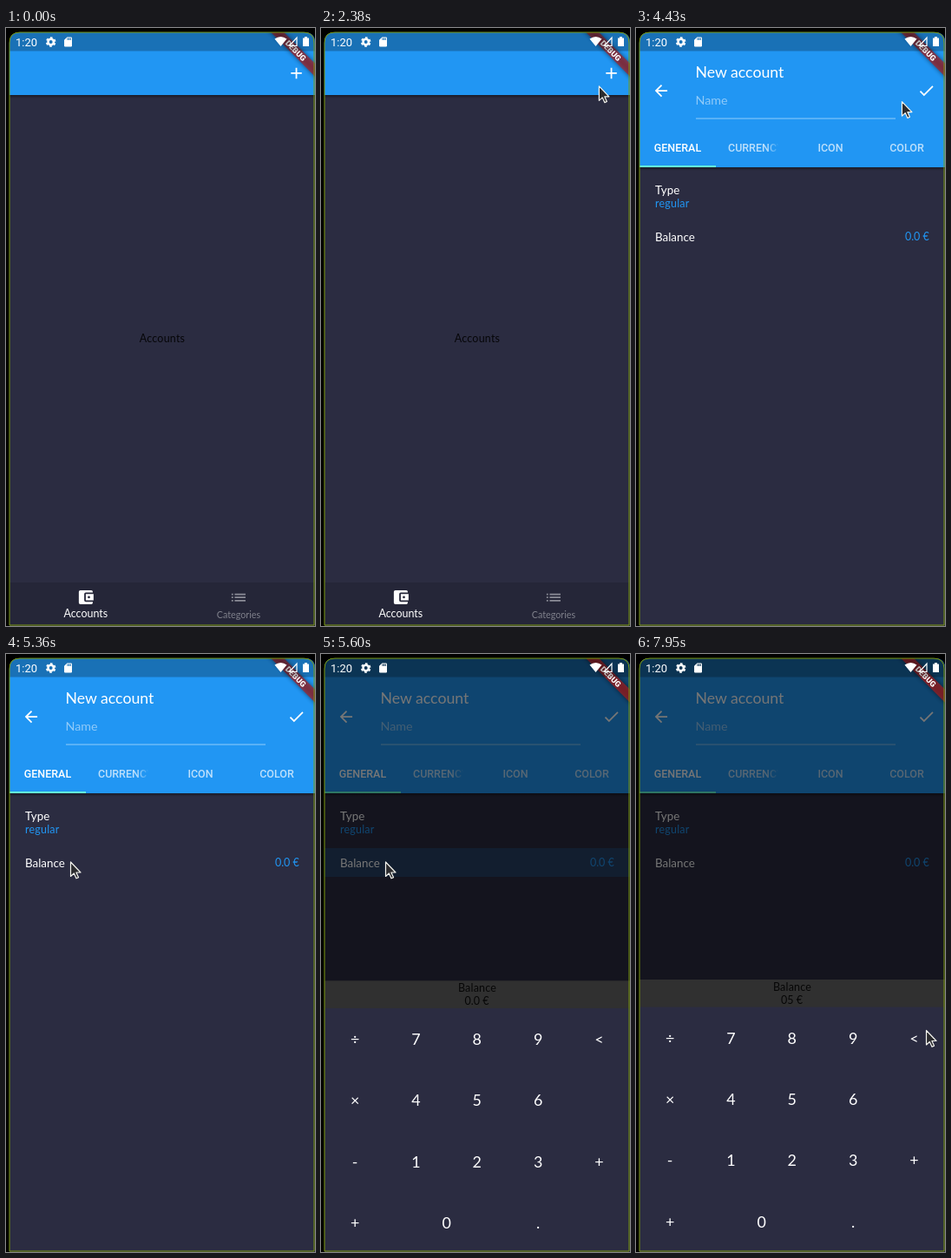
These frames come from a looping animation (356x687 px, 8 s). An HTML page:

```html
<!DOCTYPE html>
<html lang="en">
<head>
<meta charset="utf-8">
<title>New account</title>
<style>
html, body { margin: 0; width: 100%; height: 100%; overflow: hidden; background: #000; }
svg { display: block; width: 356px; height: 687px; }
text { font-family: Lato, "Open Sans", sans-serif; font-size: 12.5px; fill: #fff; white-space: pre; }
.mid { text-anchor: middle; }
.end { text-anchor: end; }
.spaced { letter-spacing: .2px; }
.row { font-size: 13.4px; }
.blue { fill: #2196f3; }
.dark { fill: #000; fill-opacity: .87; }
.tab { font-family: Roboto, sans-serif; font-weight: 500; }
.off { fill-opacity: .7; }
.key { font-size: 17.9px; text-anchor: middle; }
.icon { fill: #fff; }
</style>
</head>
<body>
<svg viewBox="0 0 356 687" width="356" height="687">
  <defs>
    <clipPath id="screen"><path d="M4 687V17Q4 5 16 5H344Q356 5 356 17V687Z"/></clipPath>
    <linearGradient id="shade" x2="0" y2="1">
      <stop stop-color="#000" stop-opacity=".4"/>
      <stop offset="1" stop-color="#000" stop-opacity="0"/>
    </linearGradient>
    <linearGradient id="fade" gradientUnits="userSpaceOnUse" x1="150" x2="165" y1="0" y2="0">
      <stop stop-color="#fff" stop-opacity=".7"/>
      <stop offset="1" stop-color="#fff" stop-opacity="0"/>
    </linearGradient>
    <clipPath id="tabBox"><rect x="106" y="120" width="57.5" height="30"/></clipPath>
    <filter id="blur" x="-20%" y="-100%" width="140%" height="300%"><feGaussianBlur stdDeviation="2.6"/></filter>
  </defs>

  <g clip-path="url(#screen)">
    <rect width="356" height="687" fill="#2b2c41"/>

    <g id="home">
      <rect x="4" y="77" width="352" height="4" fill="url(#shade)"/>
      <rect x="4" y="5" width="352" height="72" fill="#2196f3"/>
      <path class="icon" transform="translate(323.8 41.2) scale(.894)" d="M19 13h-6v6h-2v-6H5v-2h6V5h2v6h6z"/>
      <text class="mid dark spaced" x="180" y="361">Accounts</text>
      <rect x="4" y="637" width="352" height="50" fill="#252638"/>
      <path class="icon" transform="translate(81.2 643.2) scale(.894)" d="M21 18v1q0 2-2 2H5q-2 0-2-2V5q0-2 2-2h14q2 0 2 2v1h-9q-2 0-2 2v8q0 2 2 2zm-9-2h10V8H12zm4-2.500a1.500 1.500 0 1 1 0-3 1.500 1.500 0 0 1 0 3z"/>
      <text class="mid" x="91.8" y="677">Accounts</text>
      <path fill="#8b8c97" transform="translate(257.2 643.5) scale(.894)" d="M3 11h2v2H3zm0 4h2v2H3zm0-8h2v2H3zm4 4h14v2H7zm0 4h14v2H7zm0-8h14v2H7z"/>
      <text class="mid" x="268" y="678" style="font-size:10.75px;fill:#7f808b">Categories</text>
    </g>

    <g id="form">
      <rect x="4" y="5" width="352" height="682" fill="#2b2c41"/>
      <rect x="4" y="160" width="352" height="4" fill="url(#shade)"/>
      <rect x="4" y="5" width="352" height="155" fill="#2196f3"/>
      <path class="icon" transform="translate(18.2 61.3) scale(.894)" d="M20 11H7.8l5.600-5.600L12 4l-8 8 8 8 1.400-1.400L7.800 13H20z"/>
      <path class="icon" transform="translate(323.8 61.3) scale(.894)" d="M9 16.200L4.800 12l-1.400 1.400L9 19 21 7l-1.400-1.400z"/>
      <text x="68.5" y="57" style="font-size:17.7px">New account</text>
      <text x="68.5" y="88" style="font-size:14.3px" fill-opacity=".5">Name</text>
      <rect x="69" y="103.5" width="230" height="1" fill="#fff" opacity=".5"/>
      <text class="tab mid" x="48" y="141.5">GENERAL</text>
      <text class="tab" x="106" y="141.5" clip-path="url(#tabBox)" style="fill:url(#fade)">CURRENCY</text>
      <text class="tab mid off" x="224" y="141.5">ICON</text>
      <text class="tab mid off" x="312" y="141.5">COLOR</text>
      <rect x="4" y="158" width="88" height="2" fill="#64ffda"/>
      <text class="row" x="22" y="191">Type</text>
      <text class="blue spaced" x="22" y="206">regular</text>
      <rect id="rowInk" x="4" y="223" width="352" height="33" fill="#2196f3"/>
      <text class="row" x="22" y="244.5">Balance</text>
      <text class="blue end" x="337.8" y="244">0.0 €</text>
    </g>

    <rect id="scrim" x="4" y="5" width="352" height="682"/>

    <g id="sheet">
      <rect x="4" y="374" width="352" height="32" fill="#303030"/>
      <text class="mid dark spaced" x="180" y="387">Balance</text>
      <text id="amount" class="mid dark" x="179.5" y="402"></text>
      <rect x="4" y="405.6" width="352" height="282" fill="#2b2c41"/>
      <rect id="inkFive" x="146" y="476" width="69" height="69" fill="#fff"/>
      <rect id="inkBack" x="285" y="406" width="69" height="69" fill="#fff"/>
      <g id="keys"></g>
    </g>

    <g transform="translate(355 5) rotate(45)">
      <rect x="-45" y="24.5" width="90" height="10.7" opacity=".5" filter="url(#blur)"/>
      <rect x="-45" y="24.5" width="90" height="10.7" fill="#b71c1c" fill-opacity=".63"/>
      <text class="mid" y="33.1" style="font:900 9.1px Roboto,sans-serif">DEBUG</text>
    </g>

    <rect x="4" y="5" width="352" height="21.5" opacity=".25"/>
    <text x="11" y="21" style="font:13px Roboto,sans-serif">1:20</text>
    <g fill="none" stroke="#fff">
      <circle cx="51.7" cy="16" r="3.2" stroke-width="2.5"/>
      <circle cx="51.7" cy="16" r="4.9" stroke-width="1.8" stroke-dasharray="2.6 2.53" transform="rotate(15 51.7 16)"/>
      <path d="M335 11V20.500H326.500Z" stroke-width="1.2"/>
    </g>
    <path class="icon" transform="translate(64.8 9.3) scale(.56)" d="M18 2h-8L4 8v12q0 2 2 2h12q2 0 2-2V4q0-2-2-2zm-6 6h-2V4h2zm3 0h-2V4h2zm3 0h-2V4h2z"/>
    <path class="icon" d="M309.500 12.500Q316.500 7.500 323.500 12.500L316.500 21Z"/>
    <path class="icon" d="M342 11.500h2v-1.500h3v1.500h2v9.500h-7z"/>
  </g>

  <path d="M4 686V17Q4 5 16 5H343Q355 5 355 17V686Z" fill="none" stroke="#7c9a10"/>
  <path id="cursor" d="M.5 .5V17L4.300 13.500 7 19.300 9.500 18.100 6.900 12.500H12Z" fill="#2b2b2e" stroke="#f4f4ee" stroke-width="1.2" stroke-linejoin="round"/>
</svg>

<script>
const LOOP = 8000;
const APPEAR = 1500;
const FIVE = [184, 513];
const BACK = [335, 447];

// Pointer moves from START: begin, end, destination, sideways bend
const START = [102, 625];
const moves = [
  [1520, 2220, [319, 67], .16],
  [2340, 2620, [334, 56], 0],
  [4260, 5040, [74, 238.5], -.1],
  [5610, 5990, FIVE, 0],
  [6370, 6680, BACK, 0],
  [6800, 7230, FIVE, 0],
  [7640, 7950, [334, 432], 0]
];

const amounts = [[0, "0.0 €"], [6130, "0.05 €"], [6800, "0 €"], [7360, "05 €"]];

const $ = id => document.getElementById(id);
const set = (id, name, value) => $(id).setAttribute(name, value);
const clamp = v => Math.max(0, Math.min(1, v));
const span = (t, from, to) => clamp((t - from) / (to - from));
const easeOut = p => 1 - (1 - p) ** 3;
const easeInOut = p => p * p * (3 - 2 * p);
const pulse = (t, from, to) => Math.sin(Math.PI * span(t, from, to));

function buildKeys() {
  const rows = ["÷789<", "×456 ", "-123+"];
  const keys = rows.flatMap((row, r) => [...row].map((label, col) => [label, col, r]));
  keys.push(["+", 0, 3], ["0", 1.5, 3], [".", 3, 3]);
  for (const [label, col, row] of keys) {
    const key = document.createElementNS("http://www.w3.org/2000/svg", "text");
    key.setAttribute("class", "key");
    key.setAttribute("x", 39.2 + 70.3 * col);
    key.setAttribute("y", 447.5 + 70.4 * row);
    key.textContent = label;
    $("keys").append(key);
  }
}

// Point on a quadratic curve whose middle is pushed sideways by bend
function curve([ax, ay], [bx, by], bend, p) {
  const push = 2 * bend * p * (1 - p);
  const dx = bx - ax, dy = by - ay;
  return [ax + dx * p - dy * push, ay + dy * p + dx * push];
}

function pointer(t) {
  let at = START;
  for (const [begin, end, to, bend] of moves) {
    at = curve(at, to, bend, easeInOut(span(t, begin, end)));
    if (t < end) break;
  }
  return at;
}

function draw(t) {
  set("cursor", "visibility", t < APPEAR ? "hidden" : "visible");
  set("cursor", "transform", `translate(${pointer(t)})`);

  const page = easeOut(span(t, 4090, 4190));
  set("form", "opacity", page);
  set("form", "transform", `translate(0 ${40 * (1 - page)})`);

  const open = easeOut(span(t, 5400, 5640));
  set("scrim", "opacity", .54 * open);
  set("sheet", "transform", `translate(0 ${313 * (1 - open)})`);
  set("sheet", "visibility", open > 0 ? "visible" : "hidden");
  set("rowInk", "opacity", .2 * span(t, 5400, 5420) * span(t, 5800, 5620));

  set("inkFive", "opacity", .09 * (pulse(t, 6060, 6420) + pulse(t, 7290, 7650)));
  set("inkBack", "opacity", .07 * pulse(t, 6700, 6830));
  $("amount").textContent = amounts.filter(([from]) => from <= t).pop()[1];
}

buildKeys();
const origin = performance.now();
function tick() {
  draw((performance.now() - origin) % LOOP);
  requestAnimationFrame(tick);
}
tick();
</script>
</body>
</html>
```
